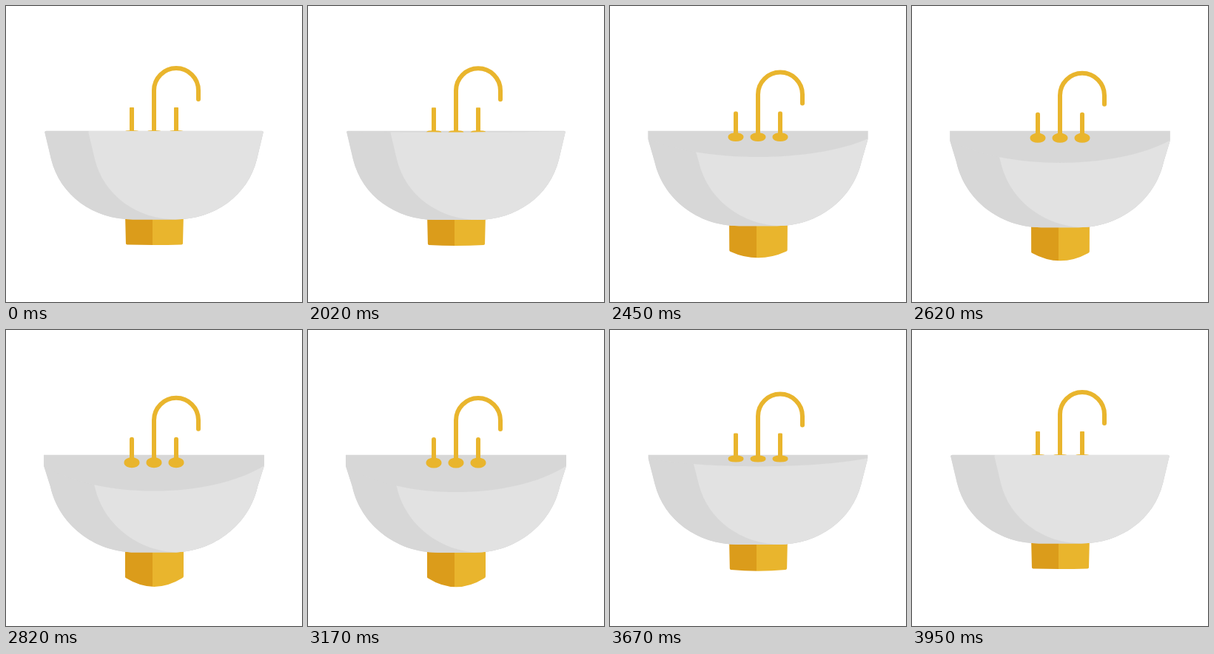
Animation, 400 px wide and 400 px high, one loop 4 s. Source, as an HTML page with a canvas:

```html
<!DOCTYPE html>
<html lang="en">
<head>
<meta charset="utf-8">
<title>Sink</title>
<style>
html, body { margin: 0; width: 100%; height: 100%; overflow: hidden; background: #fff; }
canvas { display: block; }
</style>
</head>
<body>
<canvas id="stage" width="400" height="400"></canvas>
<script>
const ctx = document.getElementById('stage').getContext('2d');
const LOOP = 4000, TOP = 168.7;
const GOLD = '#e9b52d', DARK_GOLD = '#db9c1b', GREY = '#d7d7d7', LIGHT = '#e2e2e2';

const progress = (t, from, to) => Math.min(1, Math.max(0, (t - from) / (to - from)));
const easeOut = u => 1 - (1 - u) ** 2;
const easeSine = u => (1 - Math.cos(Math.PI * u)) / 2;
const easeCubic = u => u < .5 ? 4 * u ** 3 : 1 - 4 * (1 - u) ** 3;

// Tilt of the rim and taps; drop of the underside, which returns earlier.
function pose(t) {
  const rise = easeOut(progress(t, 2000, 3000));
  return {
    tilt: t < 3000 ? rise : 1 - easeSine(progress(t, 3140, 3990)),
    drop: t < 3000 ? rise : 1 - easeCubic(progress(t, 3000, 3960))
  };
}

function bowlPath({ tilt, drop }) {
  const w = 148 + tilt, r = 2.5 * Math.max(0, 1 - 4 * tilt);
  const rim = Math.max(TOP + 15 * tilt, TOP + r);
  const shoulder = 207 + 5 * tilt, bottom = 288.5 + 12.5 * drop;
  const bend = bottom - 32.5 - 6.5 * drop;
  const x = 200 - w, side = 61 - tilt, foot = 172 + 3 * drop;
  const path = new Path2D();
  path.moveTo(x + r, TOP);
  path.quadraticCurveTo(x, TOP, x + r / 5, TOP + r);
  path.lineTo(x + r / 5, rim);
  path.lineTo(side, shoulder);
  path.bezierCurveTo(73 - 2 * drop, bend, 118, bottom, foot, bottom);
  path.lineTo(400 - foot, bottom);
  path.bezierCurveTo(282, bottom, 327 + 2 * drop, bend, 400 - side, shoulder);
  path.lineTo(400 - x - r / 5, rim);
  path.lineTo(400 - x - r / 5, TOP + r);
  path.quadraticCurveTo(400 - x, TOP, 400 - x - r, TOP);
  path.closePath();
  return path;
}

function frontPath({ tilt }) {
  const w = 148 + tilt, end = TOP + 15 * tilt;
  const bend = end + 35.5 * tilt / .75;
  const path = new Path2D();
  path.moveTo(200 - w, end);
  path.bezierCurveTo(125, bend, 275, bend, 200 + w, end);
  path.lineTo(200 + w, 400);
  path.lineTo(200 - w, 400);
  path.closePath();
  return path;
}

function drawPedestal({ drop }) {
  const corner = 322.5 + 12.5 * drop, bottom = 323 + 24.5 * drop;
  const bend = 2 * bottom - corner, left = 162 - drop, right = 239 + drop;
  const path = new Path2D();
  path.moveTo(161, 280);
  path.arcTo(left, corner, 200, bend, 1.8);
  path.quadraticCurveTo(200, bend, right - 1.8, corner + .8 * drop);
  path.quadraticCurveTo(right, corner, right, corner - 1.8);
  path.lineTo(240, 280);
  path.closePath();
  ctx.save();
  ctx.clip(path);
  ctx.fillStyle = DARK_GOLD;
  ctx.fillRect(150, 270, 48, 100);
  ctx.fillStyle = GOLD;
  ctx.fillRect(198, 270, 52, 100);
  ctx.restore();
}

function drawTaps({ tilt }) {
  const shift = 8 * tilt, base = 171.5 + shift;
  ctx.fillStyle = ctx.strokeStyle = GOLD;
  ctx.lineWidth = 6;
  ctx.lineCap = 'round';

  for (const x of [170, 200, 230]) {
    ctx.beginPath();
    ctx.ellipse(x, base, 7.5, .5 + 3.5 * tilt, 0, 0, 2 * Math.PI);
    ctx.fill();
    ctx.stroke();
  }
  for (const x of [170, 230]) {
    ctx.beginPath();
    ctx.roundRect(x - 3, 137 + shift, 6, 34, .8 + 2.2 * tilt);
    ctx.fill();
  }
  ctx.beginPath();
  ctx.moveTo(200, base);
  ctx.lineTo(200, 114 + shift);
  ctx.arc(230, 114 + shift, 30, Math.PI, 2 * Math.PI);
  ctx.lineTo(260, 126 + shift);
  ctx.stroke();
}

function drawBowlFront(bowl, state) {
  ctx.save();
  ctx.clip(frontPath(state));
  ctx.fillStyle = GREY;
  ctx.fill(bowl);
  ctx.clip(bowl);
  ctx.translate(59 + state.tilt, 0);
  ctx.fillStyle = LIGHT;
  ctx.fill(bowl);
  ctx.restore();
}

function draw(now) {
  const state = pose(now % LOOP), bowl = bowlPath(state);
  ctx.fillStyle = '#fff';
  ctx.fillRect(0, 0, 400, 400);
  drawPedestal(state);
  ctx.fillStyle = GREY;
  ctx.fill(bowl);
  drawTaps(state);
  drawBowlFront(bowl, state);
}

let start;
function tick(now) {
  start ??= now;
  draw(now - start);
  requestAnimationFrame(tick);
}
requestAnimationFrame(tick);
</script>
</body>
</html>
```
